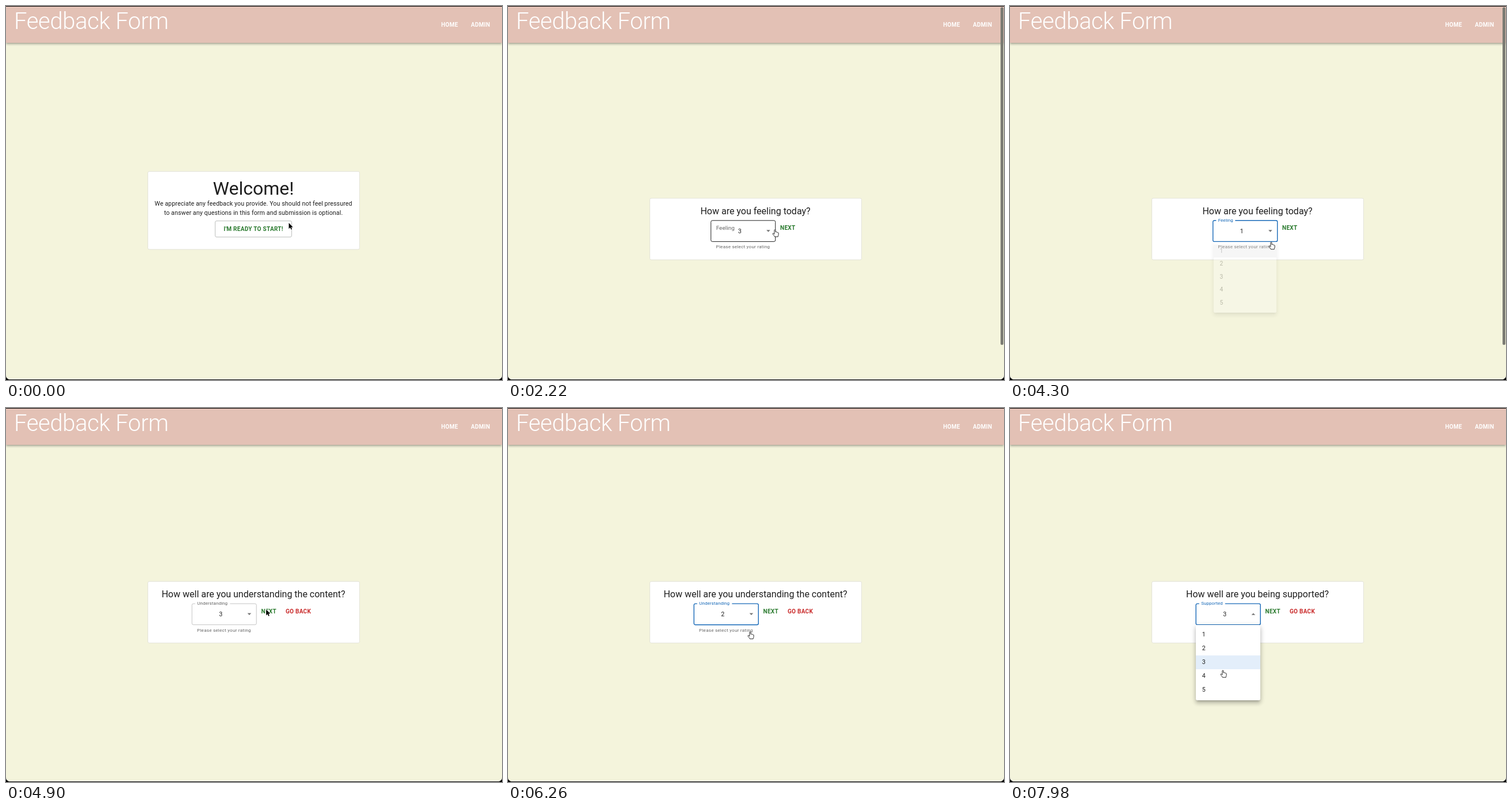
An HTML page that plays this animation: 862x650 px, repeating every 8 s.

```html
<!DOCTYPE html>
<html lang="en">
<head>
<meta charset="utf-8">
<title>Feedback Form</title>
<style>
  html, body { margin: 0; width: 100%; height: 100%; overflow: hidden; background: #000; }
  #stage { position: relative; width: 862px; height: 650px; overflow: hidden; background: #000; font-family: Roboto, Arial, sans-serif; }
  #page { position: absolute; left: 0; right: 0; top: 1px; bottom: 1px; background: #f4f4dc; border-radius: 0 0 7px 7px; overflow: hidden; box-shadow: inset 0 -1px #fafaf0; }
  #bar { height: 63px; background: #e3c1b5; box-shadow: 0 1.3px 2.7px -.7px rgba(0,0,0,.2), 0 2.7px 3.3px rgba(0,0,0,.14), 0 .7px 6.7px rgba(0,0,0,.12); }
  #scroll { position: absolute; left: 855.5px; top: 2px; width: 5.5px; height: 587px; border-radius: 3px; background: #7c7c74; }
  svg { position: absolute; left: 0; top: 0; overflow: visible; }
  text { fill: #1e1e1e; white-space: pre; }
  .mid { text-anchor: middle; }
  .body { font-size: 10.667px; letter-spacing: .1px; }
  .btn { font-size: 10px; font-weight: 600; letter-spacing: .286px; text-anchor: middle; }
  .h5 { font-size: 16px; text-anchor: middle; }
  .helper { font-size: 8px; letter-spacing: .267px; fill: #666; }
  .card { fill: #fff; stroke: #e3e3d8; stroke-width: 1; }
  .green { fill: #2a7a2e; }
  .red { fill: #c92a2a; }
  .white { fill: #fff; }
  #menu { position: absolute; width: 112.7px; height: 120.3px; padding: 5.33px 0; background: #fff; border-radius: 2.67px; transform-origin: 50% 0;
    box-shadow: 0 3.3px 3.3px -2px rgba(0,0,0,.2), 0 5.3px 6.7px .7px rgba(0,0,0,.14), 0 2px 9.3px 1.3px rgba(0,0,0,.12); }
  #menu div { height: 24px; line-height: 24px; padding-left: 10.9px; font-size: 10.667px; letter-spacing: .1px; color: #1e1e1e; }
</style>
</head>
<body>
<div id="stage">
  <div id="page"><div id="bar"></div></div>
  <svg width="862" height="650">
    <text class="white" x="14" y="40" font-size="40" font-weight="300" letter-spacing="-.333">Feedback Form</text>
    <text class="btn white" x="771" y="35.6">HOME</text>
    <text class="btn white" x="824.6" y="35.6">ADMIN</text>

    <g id="welcome">
      <rect class="card" x="246.5" y="287.5" width="368" height="135.5" rx="2.5"/>
      <text class="mid" x="430" y="328.3" font-size="32">Welcome!</text>
      <text class="body mid" x="430" y="347.4">We appreciate any feedback you provide. You should not feel pressured</text>
      <text class="body mid" x="430" y="363.4">to answer any questions in this form and submission is optional.</text>
      <rect id="start" x="363.5" y="373.5" width="133" height="28" rx="2.5" fill="#fff"/>
      <text class="btn green" x="430" y="391">I'M READY TO START!</text>
    </g>

    <g id="form">
      <g id="head">
        <rect class="card" x="246.5" y="-38.5" width="368" height="107" rx="2.5"/>
        <text id="title" class="h5" x="430" y="-11.1"></text>
      </g>
      <g id="field">
        <rect id="border" x=".4" y=".2" width="112" height="36.6" rx="2.5" fill="none"/>
        <rect id="notch" x="6" y="-1" height="3" fill="#fff"/>
        <text id="label" class="body"></text>
        <text id="value" class="body mid" x="50.4" y="22"></text>
        <path id="caret" d="M96.8 16.7h6.6l-3.3 3.4z" fill="#757575"/>
        <text class="helper" x="9.3" y="48.9">Please select your rating</text>
        <text class="btn green" x="134" y="16.9">NEXT</text>
        <text id="back" class="btn red" x="185.2" y="16.9">GO BACK</text>
      </g>
    </g>
  </svg>
  <div id="menu"></div>
  <div id="scroll"></div>
  <svg width="862" height="650">
    <g id="cursor" stroke-linejoin="round">
      <path id="arrow" d="M0 0V10.2L2.4 8 4 11.6 5.6 10.9 4.1 7.4H7.2Z" stroke="#fff" stroke-width="1.3" paint-order="stroke"/>
      <path id="hand" fill="#fff" stroke="#111" stroke-width=".9" d="M-1.1 .9C-1.1-.3 1-.3 1 .9V4.2L1.2 3.9C2 3.4 2.8 3.8 2.9 4.4 3.6 4 4.4 4.4 4.5 5 5.2 4.6 6.1 5 6.1 5.9V8.4C6.1 10 5.2 10.4 5.2 12.2H-.6C-.8 11-3.6 8.4-4 7.2-4.2 6.2-2.9 5.9-2.2 6.7L-1.1 7.8Z"/>
    </g>
  </svg>
</div>
<script>
const LOOP = 8000, FADE = 280, GROW = 187, ITEM = 24, BLUE = '#1769b8';
const $ = id => document.getElementById(id);

// shrink: label starts to float; open/close: menu; over: pointer on the field
const forms = [
  { at: 2180, x: 352.3, y: 372.6, title: 'How are you feeling today?', label: 'Feeling', notch: 33,
    shrink: 2203, over: [[2180, 2700], [2960, 3340]], open: 3356, close: 4170, pick: 1 },
  { at: 4680, x: 322.8, y: 339.9, title: 'How well are you understanding the content?', label: 'Understanding', notch: 60.5,
    shrink: 4700, over: [[5120, 5240]], open: 5260, close: 5940, pick: 2 },
  { at: 6880, x: 322.8, y: 339.9, title: 'How well are you being supported?', label: 'Supported', notch: 45,
    shrink: 6900, over: [[7120, 7340]], open: 7360, close: 9000, pick: 3 }
];

// time, x, y of the pointer tip
const path = [
  [0, 491.5, 377], [380, 403, 383], [760, 467, 384], [1000, 467, 384], [1180, 496, 384],
  [1560, 496, 384], [1800, 464, 388.8], [2680, 464, 388.8], [2860, 516, 333], [3100, 450, 399],
  [3540, 450, 399], [3880, 456, 424], [4180, 455, 424], [4300, 454, 410.6], [4560, 482, 387],
  [4700, 482, 387], [4910, 452, 350], [5180, 424, 362], [5400, 424, 362], [5700, 393, 426.5],
  [5940, 393, 426.5], [6560, 446, 355.3], [6960, 446, 355.3], [7240, 418, 362],
  [7600, 418, 378], [8100, 362, 469]
];
const handTimes = [[1560, 2700], [2960, 3340], [3640, 4680], [5100, 5260], [5500, 7360], [7640, 8000]];
const scrollTimes = [[2180, 3340], [4170, 4680]];

const clamp = v => Math.min(1, Math.max(0, v));
const within = (t, spans) => spans.some(([a, b]) => t >= a && t < b);
const mix = (a, b, p) => a + (b - a) * p;

function bezier(x1, y1, x2, y2) {
  const at = (a, b, s) => 3 * a * s * (1 - s) ** 2 + 3 * b * s * s * (1 - s) + s ** 3;
  return v => {
    v = clamp(v);
    let lo = 0, hi = 1;
    for (let i = 0; i < 24; i++) {
      const s = (lo + hi) / 2;
      if (at(x1, x2, s) < v) lo = s; else hi = s;
    }
    return at(y1, y2, (lo + hi) / 2);
  };
}
const easeInOut = bezier(.4, 0, .2, 1), easeOut = bezier(0, 0, .2, 1);

function pointer(t) {
  const i = path.findIndex(k => k[0] > t);
  const [t0, x0, y0] = path[Math.max(0, i - 1)], [t1, x1, y1] = path[i];
  const k = clamp((t - t0) / (t1 - t0)), e = k * k * (3 - 2 * k);
  return [mix(x0, x1, e), mix(y0, y1, e)];
}

function set(id, attrs) {
  for (const key in attrs) $(id).setAttribute(key, attrs[key]);
}
function show(id, on) { $(id).style.display = on ? '' : 'none'; }

const items = [1, 2, 3, 4, 5].map(n => {
  const el = document.createElement('div');
  el.textContent = n;
  return $('menu').appendChild(el);
});

function drawMenu(f, t) {
  const visible = f && t >= f.open && t < f.close + FADE;
  show('menu', visible);
  if (!visible) return;
  const closing = t >= f.close;
  const p = closing ? 1 - easeInOut((t - f.close - FADE + GROW) / GROW) : easeInOut((t - f.open) / GROW);
  const a = closing ? 1 - easeInOut((t - f.close) / FADE) : easeInOut((t - f.open) / FADE);
  const top = f.y + 37.2;
  const style = $('menu').style;
  style.left = f.x + 'px';
  style.top = top + 'px';
  style.opacity = a;
  style.transform = `scale(${mix(.75, 1, p)},${mix(.5625, 1, p)})`;

  const y = pointer(Math.max(0, t - 40))[1] - top - 5.33;
  const hover = y < 0 ? 0 : Math.floor(y / ITEM) + 1;
  items.forEach((el, i) => {
    const n = i + 1;
    let color = 'transparent';
    if (closing) { if (n === f.pick) color = 'rgba(0,0,0,.13)'; }
    else if (n === 3) color = `rgba(25,118,210,${!hover || hover === 3 ? .12 : .08})`;
    else if (n === hover) color = 'rgba(0,0,0,.04)';
    el.style.background = color;
  });
}

function drawForm(f, t) {
  show('form', f);
  if (!f) return;
  const focus = t >= f.open - 16, over = within(t, f.over);
  const p = easeOut((t - f.shrink) / 200);
  const gap = clamp((t - f.shrink - 50) / 100);
  set('head', { transform: `translate(0 ${f.y})` });
  set('field', { transform: `translate(${f.x} ${f.y})` });
  $('title').textContent = f.title;
  $('label').textContent = f.label;
  $('value').textContent = t >= f.close ? f.pick : 3;
  set('label', { transform: `translate(9.33 ${mix(22, 2.4, p)}) scale(${mix(1, .75, p)})` });
  $('label').style.fill = focus ? BLUE : '#666';
  set('notch', { width: f.notch * gap });
  set('border', { stroke: focus ? BLUE : over ? '#212121' : '#c4c4c4', 'stroke-width': focus ? 1.4 : 1 });
  set('caret', { transform: t >= f.open && t < f.close ? 'rotate(180 100.1 18.3)' : '' });
  show('back', f !== forms[0]);
}

function render(t) {
  const f = forms.filter(q => t >= q.at).pop();
  show('welcome', !f);
  const h = easeInOut((t - 1560) / 250);
  set('start', {
    fill: `rgb(${mix(255, 247, h)},${mix(255, 250, h)},${mix(255, 247, h)})`,
    stroke: `rgb(${mix(190, 46, h)},${mix(192, 125, h)},${mix(190, 50, h)})`
  });
  drawForm(f, t);
  drawMenu(f, t);
  show('scroll', within(t, scrollTimes));
  const hand = within(t, handTimes);
  show('hand', hand);
  show('arrow', !hand);
  set('cursor', { transform: `translate(${pointer(t)})` });
}

const begin = performance.now();
function tick() {
  render((performance.now() - begin) % LOOP);
  requestAnimationFrame(tick);
}
tick();
</script>
</body>
</html>
```
